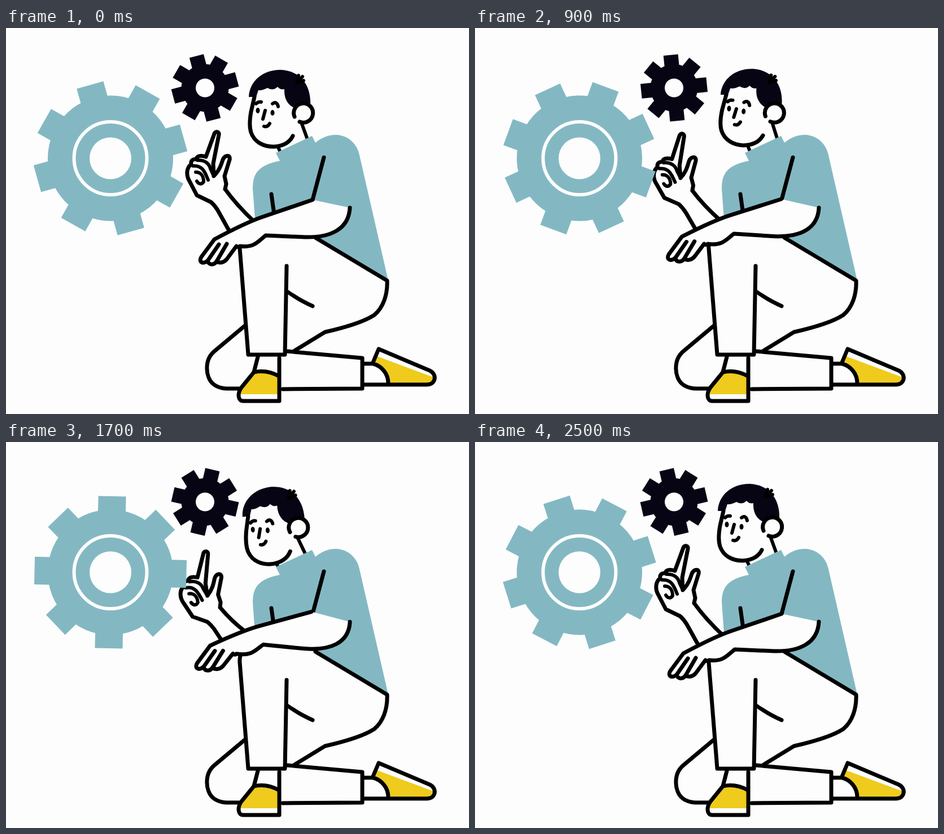
Recreate the animation shown at these times as an HTML page. Size 820x683 px, loop 2.55 s.

```html
<!DOCTYPE html>
<html lang="en">
<head>
<meta charset="utf-8">
<title>Thinking with gears</title>
<style>
  html, body { margin: 0; width: 100%; height: 100%; overflow: hidden; background: #fdfdfd; }
  svg { display: block; width: 100%; height: 100%; }
  .line { fill: none; stroke: #000; stroke-width: 7; stroke-linecap: round; stroke-linejoin: round; }
  .line .fine { stroke-width: 6; }
  .line .skin, .skin { fill: #fdfdfd; }
  .teal { fill: #83b8c3; }
  .dark { fill: #070514; }
  .yellow { fill: #efcb1d; }
</style>
</head>
<body>
<svg viewBox="0 0 820 683" xmlns="http://www.w3.org/2000/svg">
  <g id="neck" class="line">
    <path class="fine" d="M523 167L535 200M481 209L488 224"/>
  </g>

  <!-- shirt -->
  <path class="teal" d="M478 221L542 191L548 203C560 193 572 189 585 189C605 190 622 204 626 225L677 447L548 371L441 338L437 284C437 258 446 243 485 235Z"/>
  <path class="line" d="M563 229L543 304M470 294L475 330"/>

  <!-- legs -->
  <g class="line">
    <path d="M424 526L369 572C350 588 354 618 366 629C378 640 394 638 413 638"/>
    <path d="M548 371L675 447C676 472 668 495 652 508C632 521 600 530 565 538L511 571"/>
    <path d="M499 467Q522 483 543 492"/>
    <path d="M498 572L631 584V638L490 639"/>
    <path d="M420 366Q413 378 414 390L429 578H494L497 421"/>
  </g>

  <!-- rear shoe -->
  <path class="yellow" d="M655 580L757 618Q754 629 745 630H677C676 611 664 598 650 594Z"/>
  <path class="line" d="M633 594H649L660 568L750 606C764 612 762 631 745 631H633M650 594C665 598 677 611 677 629"/>

  <!-- front shoe -->
  <path class="yellow" d="M439 610Q462 604 484 616V648H414Q414 642 418 637Z"/>
  <path class="line" d="M446 582L439 609L417 636C409 647 411 660 420 660H484V584M439 609Q462 604 483 616"/>

  <g class="line">
    <path id="forearm" class="skin"/>
    <g id="hand">
      <path class="skin" d="M363 308L338 296L325 271C319 261 319 248 328 241C327 234 331 232 337 232C338 226 345 225 354 228L369 187C371 182 378 183 377 189L367 240L368 262C378 252 381 242 384 233C388 224 398 224 396 233L387 262L390 276L388 285"/>
      <path class="fine" d="M339 234C352 233 360 240 362 249L368 262M331 244C344 243 350 249 356 264L358 269M336 255C345 255 350 262 350 272C346 278 341 276 338 271"/>
    </g>
  </g>

  <g id="big" class="teal"></g>
  <circle cx="185" cy="230.5" r="64.5" fill="none" stroke="#fdfdfd" stroke-width="6"/>
  <circle class="skin" cx="185" cy="230.5" r="37"/>
  <g id="small" class="dark"></g>
  <circle class="skin" cx="352.5" cy="106" r="16.5"/>

  <g class="line">
    <path id="arm" class="skin"/>
    <path id="fingers"/>
  </g>

  <g id="head">
    <path class="dark" d="M430 122C431 94 455 74 486 74C518 75 541 98 539 137L512 142C500 137 492 126 493 108Q486 110 481 104Q473 112 463 106Q454 111 447 110L443 122Z"/>
    <g class="line">
      <path class="fine" d="M515 97L518 84M515 97L525 86M515 97L527 93"/>
      <path d="M440 122L434 148C431 165 431 176 434 185C440 202 456 210 474 210C491 209 502 203 508 191"/>
      <path class="fine" d="M443 134Q447 130 452 131M472 134C477 130 481 133 482 139"/>
      <path class="fine" d="M459 146L455 161M457 174Q463 176 467 169"/>
      <path class="skin" d="M511 157A17 17 0 1 1 520 166"/>
    </g>
    <ellipse cx="446" cy="146" rx="3.5" ry="5"/>
    <ellipse cx="472" cy="150" rx="3.5" ry="5"/>
  </g>
</svg>
<script>
const $ = id => document.getElementById(id);
const LOOP = 2550, STEP = 50;

const ARM = 'M543 304L455 334Q425 344 369 374L346 405C341 413 347 419 357 412' +
  'C360 421 369 419 373 413C378 417 386 415 391 409L408 386Q412 389 414 386' +
  'C440 389 446 378 460 367L530 370C575 371 607 356 609 318';
const FINGERS = 'M377 383L357 412M391 382L373 413';

// Eased value at t from [time, value] keys
function track(keys, t) {
  if (t <= keys[0][0]) return keys[0][1];
  for (let i = 1; i < keys.length; i++) {
    const [t0, a] = keys[i - 1], [t1, b] = keys[i];
    if (t < t1) return a + (b - a) * (1 - Math.cos(Math.PI * (t - t0) / (t1 - t0))) / 2;
  }
  return keys[keys.length - 1][1];
}

const NOD = [[34, 0], [560, 3.9], [1880, -6.1], [2490, 0]];
const LIFT = [[34, 0], [540, 1], [1100, 0], [1940, 1], [2490, 0]];

function buildGear(g, body, reach, width) {
  let parts = `<circle r="${body}"/>`;
  for (let i = 0; i < 8; i++) {
    parts += `<rect x="${-width / 2}" y="${-reach}" width="${width}" height="${reach - body + 12}" transform="rotate(${i * 45})"/>`;
  }
  g.innerHTML = parts;
}

// Lifts points more the further they are from the elbow
function bend(d, k) {
  return d.replace(/(-?[\d.]+) (-?[\d.]+)/g, (_, x, y) => {
    const u = Math.min(1, (605 - x) / 235) * k;
    return `${(+x - 9 * u).toFixed(2)} ${(+y - 17 * u).toFixed(2)}`;
  });
}

function draw(time) {
  const t = Math.floor(time % LOOP / STEP) * STEP;

  const spin = Math.min(360, Math.max(0, (t - 34) * 0.1452));
  $('big').setAttribute('transform', `translate(185 230.5) rotate(${spin - 15.6})`);
  $('small').setAttribute('transform', `translate(352.5 106) rotate(${-15 - spin})`);

  const nod = `rotate(${track(NOD, t)} 532 240)`;
  $('head').setAttribute('transform', nod);
  $('neck').setAttribute('transform', nod);

  const k = track(LIFT, t);
  $('arm').setAttribute('d', bend(ARM, k));
  $('fingers').setAttribute('d', bend(FINGERS, k));

  const dx = -9.5 * k, dy = 11 * k;
  $('hand').setAttribute('transform', `translate(${dx} ${dy}) rotate(${-7.6 * k} 376 296)`);
  const p = (x, y, a, b) => `${x + a} ${y + b}`;
  $('forearm').setAttribute('d',
    `M${p(363, 308, dx, dy)}Q${p(371, 315, dx, dy)} ${p(377, 326, dx - 1.5 * k, dy - 6 * k)}` +
    `L${p(397, 362, -15 * k, -8 * k)}L${p(440, 343, -17 * k, -7 * k)}` +
    `Q${p(408, 313, dx - 2 * k, dy - 7 * k)} ${p(388, 285, dx, dy)}`);
}

buildGear($('big'), 111, 134.5, 49);
buildGear($('small'), 42, 58.5, 26);

const start = performance.now();
function tick(now) {
  draw(Math.max(0, now - start));
  requestAnimationFrame(tick);
}
draw(0);
requestAnimationFrame(tick);
</script>
</body>
</html>
```
